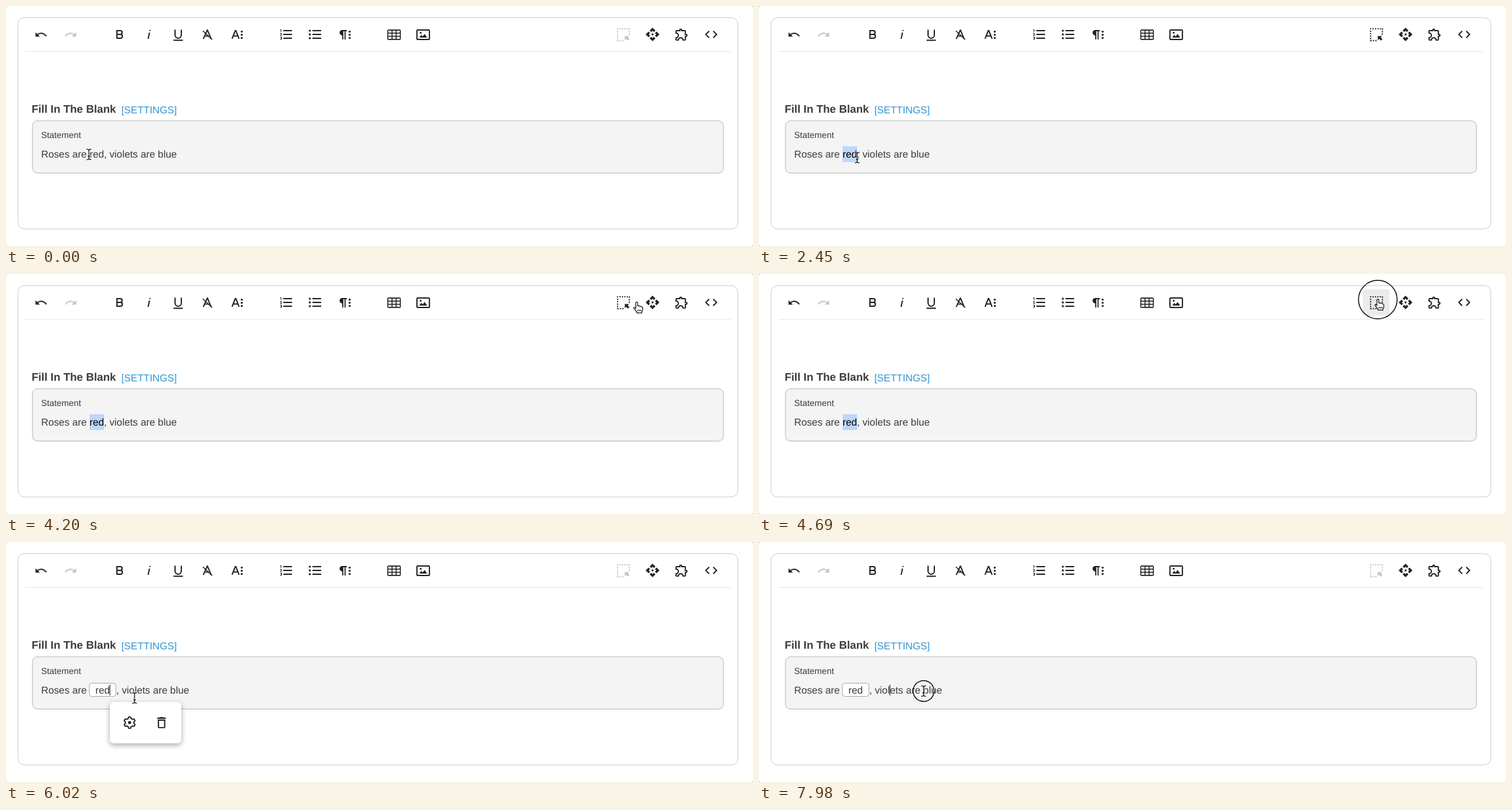
Recreate the animation shown at these times as an HTML page. Size 1180 px wide and 380 px high, loop 8000 ms.

```html
<!DOCTYPE html>
<html lang="en">
<head>
<meta charset="utf-8">
<title>Fill in the blank editor</title>
<style>
html, body { margin: 0; width: 100%; height: 100%; overflow: hidden; background: #fff; }
svg { display: block; }
text { font-family: "Liberation Sans", Arial, sans-serif; fill: #3b3b3b; text-rendering: geometricPrecision; white-space: pre; }
.icon { fill: #222; stroke: none; }
.line { fill: none; stroke: #222; }
</style>
</head>
<body>
<svg width="1180" height="380" viewBox="0 0 1180 380">
  <defs>
    <filter id="shadow" x="-20%" y="-30%" width="140%" height="170%">
      <feDropShadow dx="0" dy="3" stdDeviation="4" flood-color="#000" flood-opacity=".36"/>
    </filter>
  </defs>
  <rect width="1180" height="380" fill="#999"/>
  <rect width="1180" height="380" rx="2.5" fill="#fff"/>
  <rect x="19" y="18.5" width="1137" height="334.5" rx="10" fill="#fff" stroke="#ccc"/>
  <path d="M30 72H1145" stroke="#e4e4e4"/>
  <rect id="hover" x="954" y="24" width="42" height="42" rx="4" fill="#ebebeb"/>
  <g id="toolbar"></g>

  <text x="40.4" y="169" font-size="17.4" font-weight="bold">Fill In The Blank</text>
  <text x="182.2" y="169.8" font-size="15.8" style="fill:#2f96d3">[SETTINGS]</text>
  <rect x="41.8" y="181.8" width="1091.5" height="82.7" rx="8" fill="#f4f4f4" stroke="#b5b5b5"/>
  <text x="55.5" y="209" font-size="13.83">Statement</text>
  <rect id="mark" x="132" y="222" height="25" fill="#bdd7fb"/>
  <rect id="blank" x="131.7" y="223.5" width="42" height="21" rx="4" fill="#fff" stroke="#a8a8a8"/>
  <g font-size="15.8">
    <text x="55.5" y="240">Roses are</text>
    <text id="word" y="240">red</text>
    <text id="rest" y="240">, violets are blue</text>
  </g>
  <rect id="caret" y="226" width="1.1" height="17" fill="#222"/>

  <g id="popover">
    <rect x="164" y="253.5" width="112.7" height="65" rx="6" fill="#fff" filter="url(#shadow)"/>
  </g>

  <circle id="ring" fill="none" stroke="#111" stroke-width="1.5"/>
  <g id="beam" fill="none" stroke-linecap="round">
    <path id="beamEdge" stroke="#fff" stroke-width="2.8" stroke-opacity=".8"/>
    <path id="beamLine" stroke="#111" stroke-width="1.25"/>
  </g>
  <path id="hand" fill="#fff" stroke="#111" stroke-width="1.2" stroke-linejoin="round"
    d="M-1.4 9.5V1Q-1.4-.7 .1-.7T1.6 1V5.4Q3.2 4.4 4.4 6Q6 5.2 7 6.8Q9.5 6.4 9.5 9V11.4Q9.3 13.6 8 15V16.6H.4V15.2L-4.3 9.6Q-5.2 7.9-3.4 7.7Q-2.6 7.8-1.4 9.5ZM2 11.5V14M4.3 11.5V14M6.6 11.5V14"/>
</svg>
<script>
const $ = id => document.getElementById(id);
const set = (el, attrs) => { for (const k in attrs) el.setAttribute(k, attrs[k]); };
const show = (id, on) => set($(id), { visibility: on ? 'visible' : 'hidden' });

const fill = d => `<path class="icon" d="${d}"/>`;
const line = (d, w = 1.8, extra = '') => `<path class="line" d="${d}" stroke-width="${w}" ${extra}/>`;
const dots = (x, ys, r) => ys.map(y => `<circle class="icon" cx="${x}" cy="${y}" r="${r}"/>`).join('');

// Adds a 24-unit icon centred on (x, y).
function icon(parent, x, y, art, id = '') {
  $(parent).insertAdjacentHTML('beforeend',
    `<g id="${id}" transform="translate(${x} ${y}) scale(.985) translate(-12 -12)">${art}</g>`);
}

function gear() {
  const pts = [];
  for (let k = 0; k < 6; k++) {
    for (const [deg, r] of [[-20, 6.9], [-11, 9.2], [11, 9.2], [20, 6.9]]) {
      const a = (k * 60 - 90 + deg) * Math.PI / 180;
      pts.push((12 + r * Math.cos(a)).toFixed(2) + ' ' + (12 + r * Math.sin(a)).toFixed(2));
    }
  }
  return line('M' + pts.join('L') + 'Z', 1.9, 'stroke-linejoin="round"') + dots(12, [12], 2.5);
}

const undo = fill('M10.4 9.4c-1.7.3-3.2.9-4.6 2L3 8.5v7h7l-2.7-2.7c3.7-2.6 8.8-1.8 11.5 1.9.2.3.4.5.5.8l1.8-.9c-2.2-3.8-6.4-5.9-10.7-5.2z');
const rows = line('M7 6H21M7 12H21M7 18H21', 2);
const arrow = 'M14.5 14.5H21.5L19.2 16.8 22 19.6 19.6 22 16.8 19.2 14.5 21.5Z';
const tools = [
  [55.5, undo],
  [102, `<g opacity=".27" transform="matrix(-1 0 0 1 24 0)">${undo}</g>`],
  [179.5, line('M7.7 6H13A3 3 0 0 1 13 12H7.7M13 12H13.4A3 3 0 0 1 13.4 18H7.7V5', 2.1)],
  [226, fill('M11.7 9h2l-2.2 10h-2zM13.4 4.6a1.1 1.1 0 1 0 .01 0z')],
  [272, fill('M4.5 20.5h15v2h-15zM6 4.5h2v8.5a4 4 0 0 0 8 0V4.5h2V13a6 6 0 0 1-12 0z')],
  [318, line('M5.5 19.3L11.9 5.2H12.3L18.2 19.3M8 14.6H14.6', 1.9) + line('M4.8 6.2L19.8 20.4', 1.5)],
  [365, line('M4 19L9.1 6H10.1L15.2 19M6 14.6H13.2', 2) + dots(19.5, [7.5, 12.6, 17.7], 1.7)],
  [443, rows + line('M1.8 4.5H3.4V8.2M1.8 10.4H4.4L2.2 13.6H5M1.8 16.2H4.4V19.8H1.8M2.6 18H4.4', 1)],
  [489, rows + dots(2.8, [6, 12, 18], 1.7)],
  [535, fill('M8 5a4.2 4.2 0 0 0 0 8.4V20h1.8V7h1.9v13h1.8V7H15.5V5z') + dots(20, [7.5, 12.6, 17.7], 1.7)],
  [613, line('M3 5H21Q22 5 22 6V19Q22 20 21 20H3Q2 20 2 19V6Q2 5 3 5ZM8.7 5V20M15.3 5V20M2 10H22M2 15H22', 1.6)],
  [659, line('M3.2 4.8H20.8Q22 4.8 22 6V19Q22 20.2 20.8 20.2H3.2Q2 20.2 2 19V6Q2 4.8 3.2 4.8Z', 2)
    + fill('M5.8 17.2L9 12.6 11.2 15.2 14.2 11.2 18.4 17.2Z') + dots(8, [9.4], 1.5)],
  [975, line('M2 3H21.8V13M3 2V21.8H13', 2, 'stroke-dasharray="2 1.9"') + fill(arrow), 'blankTool'],
  [1021.3, fill('M14 12l-2 2-2-2 2-2 2 2zm-2-6l2.1 2.1 2.5-2.5L12 1 7.4 5.6l2.5 2.5L12 6zm-6 6l2.1-2.1-2.5-2.5L1 12l4.6 4.6 2.5-2.5L6 12zm12 0l-2.1 2.1 2.5 2.5L23 12l-4.6-4.6-2.5 2.5L18 12zm-6 6l-2.1-2.1-2.5 2.5L12 23l4.6-4.6-2.5-2.5L12 18z')],
  [1067.3, line('M9 6V5A1.5 1.5 0 0 1 12 5V6H17Q18 6 18 7V12H19A1.5 1.5 0 0 1 19 15H18V20Q18 21 17 21H14.2A3.7 3.7 0 0 0 6.8 21H4Q3 21 3 20V17.2A3.7 3.7 0 0 0 3 9.8V7Q3 6 4 6Z', 2)],
  [1114, fill('M9.4 16.6L4.8 12l4.6-4.6L8 6l-6 6 6 6zM14.6 16.6l4.6-4.6-4.6-4.6L16 6l6 6-6 6z')]
];
for (const [x, art, id] of tools) icon('toolbar', x, 45, art, id);
icon('popover', 195.3, 286, gear());
icon('popover', 245.7, 286, line('M7 8V19Q7 20 8 20H16Q17 20 17 19V8Z', 2) + fill('M5 4h3.5l1-1h5l1 1H19v2H5z'));

const beam = 'M-3.3-8.3Q0-8.3 0-6Q0-8.3 3.3-8.3M0-6V6M-3.3 8.3Q0 8.3 0 6Q0 8.3 3.3 8.3M-1.6 3H1.6';
set($('beamEdge'), { d: beam });
set($('beamLine'), { d: beam });

// Pointer path: time, x, y
const path = [
  [0, 131, 235], [210, 131, 233.3], [910, 131, 233.3], [1190, 138, 234.7],
  [1750, 152.5, 236], [1820, 155, 236.8], [2310, 155, 236.8], [2450, 155, 240],
  [2800, 155, 240], [3150, 330, 193], [3640, 696.5, 96], [3710, 754, 81],
  [3990, 930, 54], [4410, 1027, 41], [4689, 1027, 41], [4690, 977.5, 40.5],
  [5040, 970, 44], [5460, 823, 92], [5740, 430, 190], [6020, 203, 247],
  [6300, 203, 246], [6580, 207, 236], [7140, 207.5, 235], [7700, 260, 235.5], [8000, 260, 236]
];

// Monotone cubic through the path points.
function at(t, c) {
  const secant = i => i < 0 || i > path.length - 2 ? 0
    : (path[i + 1][c] - path[i][c]) / (path[i + 1][0] - path[i][0]);
  const slope = i => {
    const a = secant(i - 1), b = secant(i);
    return a * b <= 0 ? 0 : 2 * a * b / (a + b);
  };
  let i = 0;
  while (i < path.length - 2 && t >= path[i + 1][0]) i++;
  const [p, q] = [path[i], path[i + 1]];
  const h = q[0] - p[0], u = (t - p[0]) / h, v = 1 - u;
  return p[c] * v * v * (1 + 2 * u) + q[c] * u * u * (3 - 2 * u)
    + h * u * v * (slope(i) * v - slope(i + 1) * u);
}

const within = (t, a, b) => t >= a && t < b;
const STEP = 70, LOOP = 8000;

function draw(ms) {
  const t = Math.floor(ms / STEP) * STEP;
  const x = at(t, 1), y = at(t, 2);
  const made = t >= 4830;

  // Selection snaps to letter edges while dragging.
  const end = t < 980 || x < 135 ? 132 : x < 142.5 ? 138 : x < 151 ? 146.5 : 155;
  const width = made ? 0 : t >= 1820 ? 23 : end - 132;
  set($('mark'), { width });
  $('word').style.fill = width > 20 ? '#000' : '';

  show('blank', made);
  set($('word'), { x: made ? 141.2 : 131.9 });
  set($('rest'), { x: made ? 174.2 : 154.7 });
  show('popover', within(t, 4900, 6580));
  show('hover', within(t, 4690, 4830));
  set($('blankTool'), { opacity: within(t, 1400, 4830) ? 1 : .27 });

  const moved = t >= 6580;
  const since = t - (moved ? 6580 : 4900);
  show('caret', since >= 0 && since % 1060 < 530);
  set($('caret'), { x: moved ? 206.3 : 163.6 });

  const pressed = within(t, 770, 2170) || within(t, 4690, 4900) || within(t, 6510, 6790) || t >= 7980;
  const r = within(t, 4690, 4900) ? 30.5 - (t - 4690) / 10 : 16.5;
  show('ring', pressed);
  set($('ring'), { cx: x, cy: y, r });

  const pointing = x > 955 && y < 62;
  show('beam', !pointing);
  show('hand', pointing);
  set($(pointing ? 'hand' : 'beam'), { transform: `translate(${x} ${y})` });
}

const start = performance.now();
function tick() {
  draw((performance.now() - start) % LOOP);
  requestAnimationFrame(tick);
}
tick();
</script>
</body>
</html>
```
